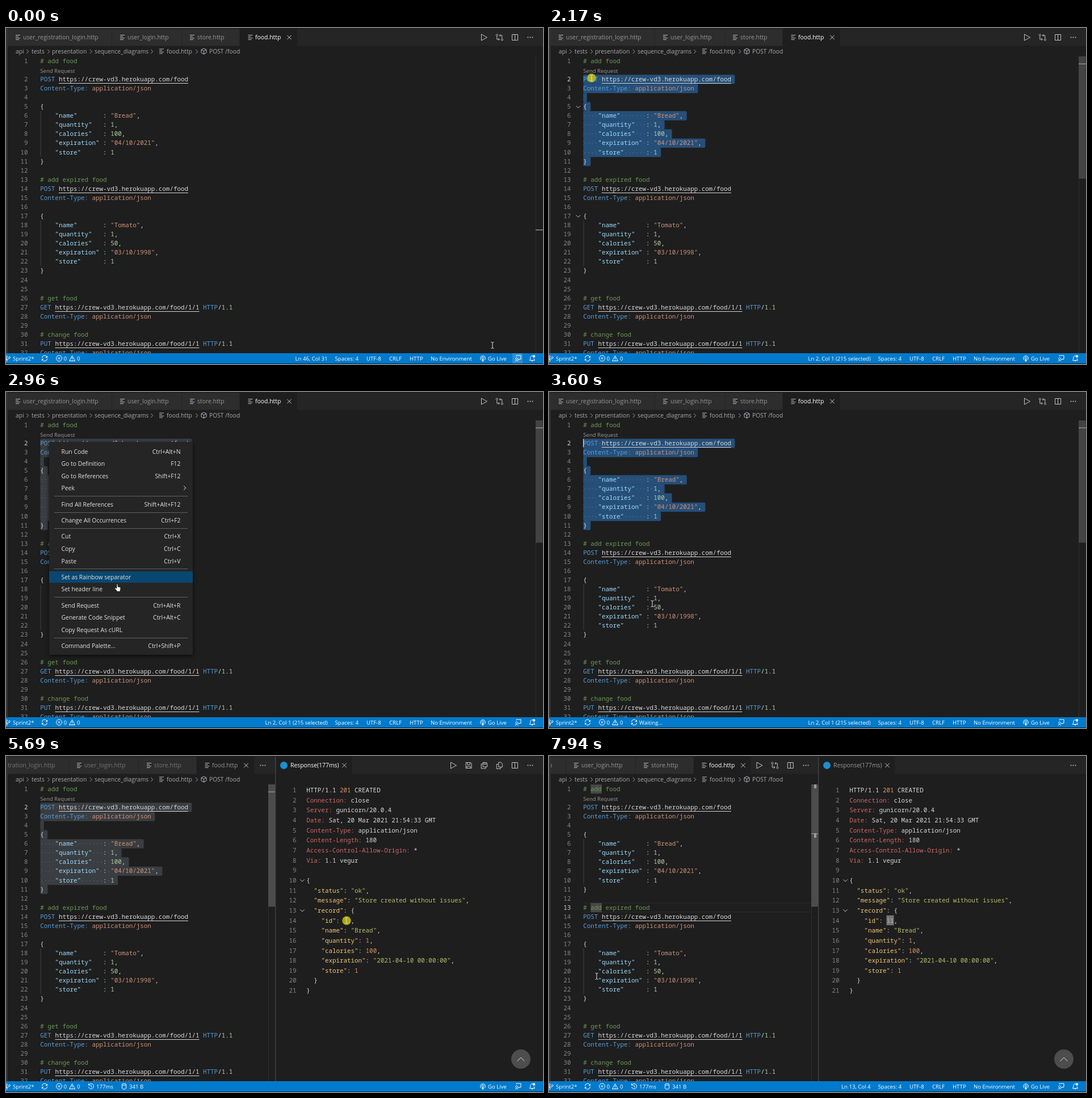
Animation, 946 px wide and 592 px high, one loop 8000 ms. Source, as an HTML page:

```html
<!DOCTYPE html>
<html lang="en">
<head>
<meta charset="utf-8">
<title>Editor</title>
<style>
html, body { margin: 0; width: 100%; height: 100%; overflow: hidden; background: #1e1e1e; }
svg { display: block; }
text { white-space: pre; fill: #ccc; font: 10.4px "Open Sans", "Noto Sans", sans-serif; }
.code { font: 500 10.86px "Noto Sans Mono", "DejaVu Sans Mono", monospace; fill: #d8d8d8; }
.num { font-weight: 400; fill: #858585; text-anchor: end; }
.num.on { fill: #d0d0d0; }
.lens { font-size: 9.55px; fill: #999; }
.crumb { font-size: 10.3px; fill: #a9a9a9; }
.status { font-size: 9.6px; fill: #fff; }
.end { text-anchor: end; }
.tab { fill: #969696; }
.active { fill: #fff; }
.blur .tab { fill: #747474; }
.blur .active { fill: #929292; }
.comment { fill: #6a9955; } .word { fill: #569cd6; } .key { fill: #9cdcfe; }
.string { fill: #ce9178; } .digit { fill: #b5cea8; }
.head { fill: #cc6666; } .rkey { fill: #f0c674; } .rstring { fill: #b5bd68; } .rdigit { fill: #de935f; }
.dots { fill: #9aa5b0; opacity: .4; }
.sel rect { fill: #264f78; }
.dim .sel rect { fill: #3a3d41; }
.icon { fill: none; stroke-width: 1; }
#menu { filter: drop-shadow(0 2px 3px #000a); }
#menu text { fill: #e2e2e2; }
</style>
</head>
<body>
<svg id="stage" width="946" height="592"></svg>
<script>
const LOOP = 8000, CHAR = 6.515, ROW = 16.07;
const stage = document.getElementById('stage');
const $ = id => document.getElementById(id);
const lineY = n => n === 1 ? 58.2 : 90.2 + ROW * (n - 2);

const rect = (x, y, w, h, fill, extra = '') =>
  `<rect x="${x}" y="${y}" width="${w}" height="${h}" fill="${fill}" ${extra}/>`;
const text = (x, y, str, cls = '') => `<text x="${x}" y="${y + 3.8}" class="${cls}">${str}</text>`;
const group = (id, body, extra = '') => `<g id="${id}" ${extra}>${body}</g>`;

const shapes = {
  file: 'M-4-4H4M-4-1.3H1M-4 1.3H4M-4 4H2',
  close: 'M-3.7-3.7 3.7 3.7M3.7-3.7-3.7 3.7',
  play: 'M-4.5-5.5 5.5 0-4.5 5.5Z',
  compare: 'M-4.5-5.5a1.6 1.6 0 1 0 .1 0M4.5 2.5a1.6 1.6 0 1 0 .1 0M-4.5-2V3.5H0M-2 1.5 0 3.5-2 5.5M4.5 2V-3.5H0M2-5.5 0-3.5 2-1.5',
  split: 'M-5-5H5V5H-5ZM0-5V5',
  save: 'M-5-5H3.5L5-3.5V5H-5ZM-2.5-5V-1.5H2.5V-5M-3 5V1.5H3V5',
  saveAll: 'M-2-5H4L5.5-3.5V2.5H-2ZM0-5V-2H3.5V-5M-2-2.5H-5V5.5H3V2.5',
  copy: 'M-1.5-5.5H2.5L5-3V3H-1.5ZM-1.5-2H-5V6H2V3',
  right: 'M-1.7-3.5 1.7 0-1.7 3.5',
  down: 'M-3.7-1.8 0 1.9 3.7-1.8',
  up: 'M-6.5 3.2 0-3.2 6.5 3.2',
  cube: 'M0-5 4.5-2.7V2.7L0 5-4.5 2.7V-2.7ZM-4.5-2.7 0-.5 4.5-2.7M0-.5V5',
  branch: 'M-2-4.5a1.4 1.4 0 1 0 .1 0M-2 2.5a1.4 1.4 0 1 0 .1 0M3-3a1.4 1.4 0 1 0 .1 0M-2-1.7V2.5M3-.2Q3 1.5-2 1.5',
  sync: 'M-4.5-.5A4.3 4.3 0 0 1 4-1.5M4.5.5A4.3 4.3 0 0 1-4 1.5M2-1.5H4.5V-4M-2 1.5H-4.5V4',
  error: 'M0-5A5 5 0 1 0 .1-5M-2-2 2 2M2-2-2 2',
  warning: 'M0-4.5 5 4.5H-5ZM0-1.5V1.5M0 2.5V3.5',
  history: 'M-4-2.5A4.6 4.6 0 1 1-4.5 1M-4.5-5V-2H-1.5M0-2.5V.5L2 1.5',
  data: 'M-3.5-3.5A3.5 1.5 0 1 1 3.5-3.5A3.5 1.5 0 1 1-3.5-3.5V3.5A3.5 1.5 0 0 0 3.5 3.5V-3.5',
  live: 'M-3 3A4.3 4.3 0 1 1 3 3M-1.2.8A1.8 1.8 0 1 1 1.2.8M0 0V5M-1 2H1V5H-1Z',
  feedback: 'M-2.5-1a1.8 1.8 0 1 0 .1 0M-5 5.5Q-2.5 1 0 5.5M-3-3.5V-5H5V1.5H3L1 3V1',
  bell: 'M-4.5 3.5Q-3.2 2-3.2-1A3.2 3.4 0 0 1 1-4.2M3.2.2Q3.2 2 4.5 3.5H-4.5M-1.2 4.8H1.2'
};
const icon = (name, x, y, color = '#c5c5c5') =>
  `<path class="icon" d="${shapes[name]}" transform="translate(${x} ${y})" stroke="${color}"/>`;
const more = (x, y = 16.5) =>
  [-4, 0, 4].map(d => `<circle cx="${x + d}" cy="${y}" r="1" fill="#c5c5c5"/>`).join('');

// Wraps each regex group in a span of the class with the same index.
const paint = (line, regex, classes) => line.replace(regex, (match, ...groups) =>
  `<tspan class="${classes[groups.findIndex((g, i) => g && i < classes.length)]}">${match}</tspan>`);

const site = 'https://crew-vd3.herokuapp.com/food';
const json = 'Content-Type: application/json';
const item = (name, expiry, calories) => ['{',
  `    "name"       : "${name}",`, '    "quantity"   : 1,', `    "calories"   : ${calories},`,
  `    "expiration" : "${expiry}",`, '    "store"      : 1', '}'];
const source = ['# add food', `POST ${site}`, json, '', ...item('Bread', '04/10/2021', 100), '',
  '# add expired food', `POST ${site}`, json, '', ...item('Tomato', '03/10/1998', 50), '', '',
  '# get food', `GET ${site}/1/1 HTTP/1.1`, json, '', '# change food', `PUT ${site}/1/1 HTTP/1.1`, json];
const sourceRule = /(^#.*)|(^(?:POST|GET|PUT)|HTTP(?=\/)|^Content-Type:)|(https:\S+)|("\w+"(?=\s*:))|(".*?"|application\/json)|(\d[\d.]*)/g;
const sourceClasses = ['comment', 'word', 'url', 'key', 'string', 'digit'];

function codeLine(line, i) {
  const n = i + 1, y = lineY(n);
  const at = line.indexOf('https');
  const url = at < 0 ? '' : line.slice(at).split(' ')[0];
  return `<text id="num${n}" class="code num" x="38.5" y="${y + 3.8}">${n}</text>` +
    text(60.3, y, paint(line, sourceRule, sourceClasses), 'code') +
    (url && rect(60.3 + at * CHAR, Math.round(y + 6.8), url.length * CHAR, 1, '#d4d4d4'));
}

function selectedLine(n) {
  const line = source[n - 1], y = lineY(n);
  const dots = line.replace(/\S/g, '\0').replace(/ /g, '·').replace(/\0/g, ' ');
  return group('sel' + n, rect(60.3, y - 8, (line.length + 1) * CHAR, ROW + .3, '', 'rx="2"') +
    text(60.3, y, dots, 'code dots'), 'class="sel"');
}

const guide = (id, first) => group(id, rect(60.5, lineY(first) - 8, 1, ROW * 5, '#404040'));

const tabs = [['user_registration_login.http', 3, 183], ['user_login.http', 187, 122], ['store.http', 310, 101], ['food.http', 412, 101]];
const tabBar = tabs.map(([name, x, w], i) => {
  const on = i === 3;
  return rect(x, 1.5, w, 30, on ? '#1e1e1e' : '#2d2d2d') + icon('file', x + (on ? 18.5 : 18), 16.5, '#b8bcc0') +
    text(x + 27, 16.5, name, on ? 'active' : 'tab');
}).join('') + icon('close', 499, 16.5, '#d0d0d0');

const crumbs = [['api', 17], ['tests', 45], ['presentation', 81], ['sequence_diagrams', 156], ['food.http', 283], ['POST /food', 358]];
const breadcrumb = crumbs.map(([name, x]) => text(x, 41.5, name, 'crumb')).join('') +
  [38, 75, 149.5, 257, 336].map(x => icon('right', x, 41.5, '#a0a0a0')).join('') +
  icon('file', 274, 41, '#b8bcc0') + icon('cube', 348.5, 41, '#b5b5c8');

const menuItems = [['Run Code', 'Ctrl+Alt+N', 105], ['Go to Definition', 'F12', 126.3], ['Go to References', 'Shift+F12', 147.7],
  ['Peek', '', 169], ['Find All References', 'Shift+Alt+F12', 198], ['Change All Occurrences', 'Ctrl+F2', 226.3],
  ['Cut', 'Ctrl+X', 254.5], ['Copy', 'Ctrl+C', 276], ['Paste', 'Ctrl+V', 298], ['Set as Rainbow separator', '', 326],
  ['Set header line', '', 347.3], ['Send Request', 'Ctrl+Alt+R', 376], ['Generate Code Snippet', 'Ctrl+Alt+C', 397.5],
  ['Copy Request As cURL', '', 419], ['Command Palette...', 'Ctrl+Shift+P', 447.3]];
const menu = rect(76, 88, 253, 375, '#252526') + rect(76, 0, 253, 20, '#094771', 'id="hover"') +
  menuItems.map(([name, keys, y]) => text(97.5, y, name) + text(307.5, y, keys, 'end')).join('') +
  [183, 212, 240, 311, 361, 433].map(y => rect(85, y, 235, 1, '#606061')).join('') + icon('right', 315, 169, '#f0f0f0');

const response = ['HTTP/1.1 201 CREATED', 'Connection: close', 'Server: gunicorn/20.0.4', 'Date: Sat, 20 Mar 2021 21:54:33 GMT',
  'Content-Type: application/json', 'Content-Length: 180', 'Access-Control-Allow-Origin: *', 'Via: 1.1 vegur', '',
  '{', '  "status": "ok",', '  "message": "Store created without issues",', '  "record": {', '    "id": 11,', '    "name": "Bread",',
  '    "quantity": 1,', '    "calories": 100,', '    "expiration": "2021-04-10 00:00:00",', '    "store": 1', '  }', '}'];
const responseLine = (line, i) => {
  const y = 60.3 + 17.65 * i;
  const body = i < 9 ? paint(line, /(^[A-Z][\w-]+:)|(201)/g, ['head', 'rdigit'])
    : paint(line, /("\w+"(?=:))|(".*?")|(\d+)/g, ['rkey', 'rstring', 'rdigit']);
  return text(511.5, y, i + 1, 'code num') + text(529.3, y, body, 'code');
};

const rightPane = rect(474, 0, 472, 573, '#1e1e1e') + rect(474, 1.5, 472, 30, '#252526') + rect(476, 1.5, 133.5, 30, '#1e1e1e') +
  rect(474, 1.5, 1.3, 571.5, '#444') + '<circle cx="489.5" cy="16.5" r="6.5" fill="#1b8fd0"/>' +
  `<text id="title" x="501" y="20.3">Response(177ms)</text>` + icon('close', 596, 16.5) + more(923.5) +
  group('rightTools', ['play', 'save', 'saveAll', 'copy', 'split'].map((name, i) => icon(name, 788 + 27.1 * i, 16.5)).join('')) +
  group('response', response.map(responseLine).join('') + icon('down', 522, 219.3) + icon('down', 522, 272.2) +
    group('picked', rect(594.5, 280.8, 13, 17.4, '', 'id="pickedBox"') + text(594.5, 289.7, '11', 'code')) +
    '<circle cx="907" cy="534" r="17" fill="#4d4d4d"/>' + icon('up', 907, 534.5, '#e0e0e0'));

const label = (x, str) => text(x, 582.5, str, 'status');
const badge = (name, x) => icon(name, x, 582, '#fff');
const statusBar = rect(0, 573, 946, 18, '#007acc') + rect(0, 591, 946, 1, '#0f2233') +
  rect(892, 573, 18, 18, '#2a8fd4', 'id="feedbackHover"') +
  badge('branch', 3) + label(12, 'Sprint2*') + badge('sync', 68) + badge('error', 93.5) + label(101.5, '0') +
  badge('warning', 116.5) + label(125, '0') +
  group('waiting', badge('sync', 150) + label(159, 'Waiting...')) +
  group('timing', badge('history', 150) + label(159, '177ms') + badge('data', 208) + label(217, '341 B')) +
  group('fileInfo', '<text id="place" class="status end" x="566.5" y="586.3"></text>' + label(579.5, 'Spaces: 4') + label(635, 'UTF-8') +
    label(675, 'CRLF') + label(711, 'HTTP') + label(748, 'No Environment')) +
  badge('live', 840) + label(849, 'Go Live') + badge('feedback', 902) + badge('bell', 927) + '<circle cx="930" cy="578.5" r="2.3" fill="#fff"/>';

const ruler = rect(933, 50, 1, 523, '#303030') + rect(933, 50, 12.5, 215.5, '#434343', 'id="slider"') +
  rect(933, 0, 13, 1.5, '#8c8c8c', 'id="mark"') +
  group('wordMarks', rect(938, 50, 4, 7, '#9a9a9a') + rect(938, 136, 4, 8, '#9a9a9a'));

const words = [1, 13].map(n => rect(60.3 + 2 * CHAR, lineY(n) - 8, 3 * CHAR, ROW, '#474748')).join('');
const lineBorder = [-8, 8].map(d => rect(60, lineY(13) + d - .5, 402, 1, '#2b2b2b')).join('');

const pointer = '<circle id="click" r="7.8" fill="#d6d000" opacity=".75"/>' +
  group('ibeam', '<path d="M-2.5-5.5Q0-5.5 0-4Q0-5.5 2.5-5.5M0-4V4M-2.5 5.5Q0 5.5 0 4Q0 5.5 2.5 5.5" fill="none" stroke="#e0e0e0"/>') +
  group('arrow', '<path d="M0-6V7L-3 4.3-5 8.5-6.8 7.6-5 3.6H-9Z" fill="#fff" stroke="#000" stroke-width=".6"/>') +
  group('hand', '<path d="M-1 3Q0 1.6 1 3V7L5 8Q6 8 6 10L5 14V15.5H-1V14L-4.5 10Q-3.5 8-1 10Z" fill="#fff" stroke="#111" stroke-width=".7"/>');

stage.innerHTML = rect(0, 0, 946, 592, '#1e1e1e') + rect(0, 1.5, 946, 30, '#252526') + group('tabs', tabBar) +
  rect(0, 0, 3, 573, '#333') + ['play', 'compare', 'split'].map((name, i) => icon(name, 842 + 27.3 * i, 16.5)).join('') + more(923.5) +
  group('splitTools', rect(437, 1.5, 37, 30, '#252526') + more(452.5)) +
  group('focusTools', rect(356, 1.5, 118, 30, '#252526') +
    ['play', 'compare', 'split'].map((name, i) => icon(name, 370.5 + 27.4 * i, 16.5)).join('') + more(452.5)) +
  breadcrumb + group('lineBorder', lineBorder) + group('words', words) + guide('guide1', 6) + guide('guide2', 18) +
  Array.from({ length: 10 }, (_, i) => selectedLine(i + 2)).join('') +
  text(60.3, 74.7, 'Send Request', 'lens') + source.map(codeLine).join('') +
  group('folds', icon('down', 51.5, 139) + icon('down', 51.5, 331.5)) +
  rect(60, 82.5, 1.3, 15, '#d0d0d0', 'id="caret"') + group('ruler', ruler) +
  group('menu', menu) + group('rightPane', rightPane) + statusBar + group('pointer', pointer);

// Pointer stops: time, x, y.
const path = [[0, 857, 559], [70, 857, 559], [850, 80, 249], [930, 80, 249], [1250, 58, 170], [1600, 34, 90], [1890, 34, 90],
  [2110, 75, 88], [2240, 75, 88], [2660, 130, 148], [2730, 130, 148], [2960, 196, 336], [3370, 182, 373], [3610, 182, 373],
  [4280, 487, 321], [4360, 487, 321], [4600, 568, 285], [5140, 614, 302], [5220, 614, 302], [5400, 593, 290], [5530, 600, 290],
  [5900, 600, 290], [6440, 552, 223], [6600, 344, 234], [7050, 80, 267], [7400, 80, 267], [7940, 84, 388], [LOOP, 84, 388]];

function pointerAt(t) {
  const i = path.findIndex(stop => stop[0] > t);
  const [t0, x0, y0] = path[i - 1], [t1, x1, y1] = path[i];
  const u = (t - t0) / (t1 - t0), ease = u * u * (3 - 2 * u);
  return [x0 + (x1 - x0) * ease, y0 + (y1 - y0) * ease];
}

const show = (id, on) => { $(id).style.display = on ? '' : 'none'; };
const within = (t, from, to) => t >= from && t < to;

function draw(t) {
  const [x, y] = pointerAt(t);
  const split = t >= 3980, clicked = t >= 7230, settled = t >= 7410;
  const menuOpen = within(t, 2240, 3520), rightFocus = split && !clicked;

  // The drag starts on line 12 and runs up to line 2.
  const dragLine = t < 930 ? 12 : t > 1600 ? 2 : Math.max(2, Math.min(12, Math.round((y - 90) / ROW) + 2));
  const first = clicked ? 12 : dragLine;
  let count = 0;
  for (let n = 2; n <= 11; n++) {
    show('sel' + n, n >= first);
    if (n >= first) count += source[n - 1].length + 2;
  }
  const row = clicked ? 13 : t < 900 ? 46 : first;
  source.forEach((_, i) => $('num' + (i + 1)).classList.toggle('on', i + 1 === row));
  $('place').textContent = clicked ? 'Ln 13, Col 4' : t < 900 ? 'Ln 46, Col 31'
    : `Ln ${row}, Col 1` + (count ? ` (${count} selected)` : '');

  stage.classList.toggle('dim', menuOpen || split);
  stage.classList.toggle('blur', rightFocus);
  show('guide1', first > 6);
  show('folds', within(t, 1330, 2240));
  show('caret', within(t, 3520, 3980));
  show('lineBorder', clicked);
  show('words', settled);
  show('wordMarks', settled);

  $('tabs').setAttribute('transform', `translate(${settled ? -157 : split ? -76 : 0})`);
  $('ruler').setAttribute('transform', `translate(${split ? -471 : 0})`);
  show('slider', t >= 150);
  $('slider').setAttribute('fill', split ? '#4c4c4c' : '#434343');
  $('mark').setAttribute('y', clicked ? 136 : t < 900 ? 355 : 62.5 + (first - 2) * 7.3);

  show('menu', menuOpen);
  const near = menuItems.reduce((a, b) => Math.abs(b[2] - y) < Math.abs(a[2] - y) ? b : a);
  $('hover').setAttribute('y', Math.round(near[2] - 10));
  show('hover', menuOpen && y > 95);

  show('splitTools', split && !clicked);
  show('focusTools', clicked);
  show('rightPane', split);
  show('rightTools', !clicked);
  show('response', t >= 4060);
  show('picked', t >= 5760);
  $('pickedBox').setAttribute('fill', clicked ? '#757575' : '#0f62d6');
  $('picked').lastChild.style.fill = clicked ? '#b0b0b0' : '#fff';
  $('title').style.fill = clicked ? '#989898' : '#fff';

  show('feedbackHover', t < 150);
  show('waiting', within(t, 3590, 3980));
  show('timing', split);
  show('fileInfo', !rightFocus);

  const gutter = x < 46;
  $('pointer').setAttribute('transform', `translate(${x.toFixed(1)} ${y.toFixed(1)})`);
  show('hand', menuOpen);
  show('arrow', gutter);
  show('ibeam', !menuOpen && !gutter);
  show('click', within(t, 930, 1000) || within(t, 2110, 2240) || within(t, 3520, 3595) || within(t, 5690, 5900) || within(t, 7150, 7300));
}

const start = performance.now();
function tick() {
  draw((performance.now() - start) % LOOP);
  requestAnimationFrame(tick);
}
tick();
</script>
</body>
</html>
```
